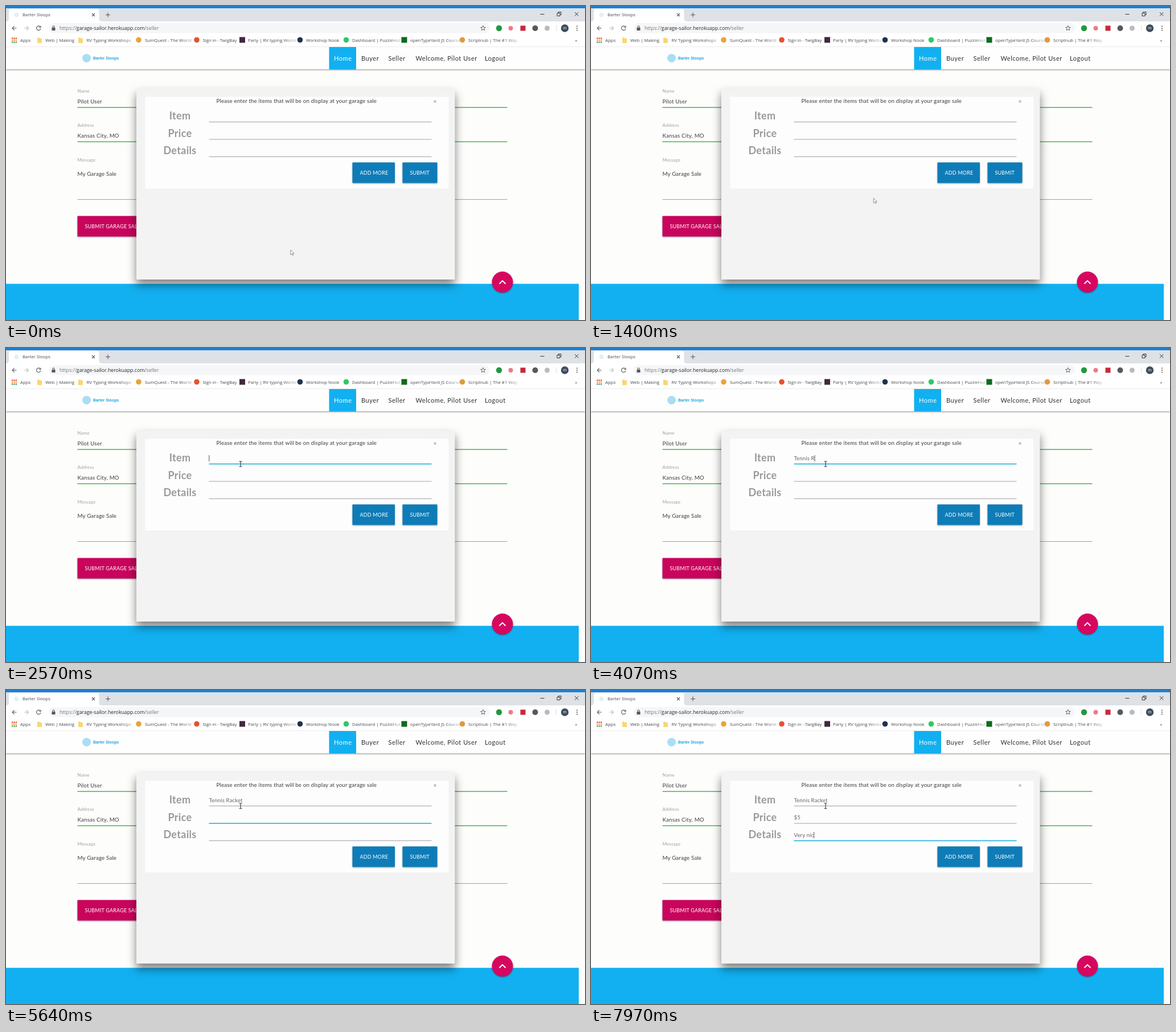
Recreate the animation shown at these times as an HTML page. Size 1017x551 px, loop 8000 ms.

```html
<!DOCTYPE html>
<html lang="en">
<head>
<meta charset="utf-8">
<title>Barter Sloops</title>
<style>
  html, body { margin: 0; width: 100%; height: 100%; overflow: hidden; background: #fdfdfc; }
  svg { display: block; width: 100vw; height: 100vh; }
  text { font: 9.7px Lato, sans-serif; letter-spacing: .018em; fill: #3c3c3c; white-space: pre; }
  .ui text { font: 7.8px "Open Sans", sans-serif; letter-spacing: 0; fill: #45484c; }
  .ui .url { font-size: 8.75px; fill: #75797e; }
  .url tspan { fill: #26282b; }
  .ui .badge { font-size: 7px; fill: #fff; text-anchor: middle; }
  .icon { fill: none; stroke: #55585c; stroke-width: 1.1; }
  .nav text { font-size: 11px; letter-spacing: .55px; fill: #2c2c2c; }
  .nav .brand { font: bold 6.9px "Liberation Sans", Arial, sans-serif; letter-spacing: 0; fill: #1aa5e0; }
  .nav .on { fill: #fff; }
  .label text { font-size: 8px; fill: #a0a0a0; }
  .head text { font-size: 18px; font-weight: bold; fill: #999; text-anchor: middle; }
  .btn { filter: drop-shadow(0 1px 1.2px rgba(0, 0, 0, .4)); }
  .btn text { font-size: 9px; fill: #fff; letter-spacing: .02em; }
  .field text { font-size: 9.5px; fill: #666; }
  .bar { filter: drop-shadow(0 1px 1.5px rgba(0, 0, 0, .45)); }
  .modal { filter: drop-shadow(0 9px 8px rgba(0, 0, 0, .5)); }
</style>
</head>
<body>
<svg viewBox="0 0 1017 551">
  <defs>
    <linearGradient id="fade">
      <stop offset="0" stop-color="#fff" stop-opacity="0"/>
      <stop offset=".6" stop-color="#fff"/>
    </linearGradient>
  </defs>

  <rect width="1017" height="551" fill="#fdfdfc"/>

  <g class="label">
    <text x="125.5" y="152">Name</text>
    <text x="125.5" y="212">Address</text>
    <text x="125.5" y="272.5">Message</text>
  </g>
  <text x="125.5" y="171">Pilot User</text>
  <text x="125.5" y="231">Kansas City, MO</text>
  <text x="125.5" y="297.5">My Garage Sale</text>
  <path d="M125.5 178H880.5M125.5 238.2H880.5" stroke="#4db451" stroke-width="1.6"/>
  <path d="M125.5 339.5H880.5" stroke="#a0a0a8"/>
  <g class="btn">
    <rect x="125.5" y="368.5" width="125" height="36" rx="1" fill="#c9045c"/>
    <text x="138.5" y="390">SUBMIT GARAGE SALE</text>
  </g>
  <rect y="487.5" width="1006" height="63.5" fill="#12b0f0"/>

  <g class="nav">
    <rect class="bar" y="60" width="1017" height="51" fill="#fefefe"/>
    <rect x="567.5" y="72" width="47.5" height="39.5" fill="#12b0f0"/>
    <circle cx="141.5" cy="91.5" r="7.5" fill="#a9def4"/>
    <text class="brand" x="153" y="94">Barter Sloops</text>
    <text class="on" x="576" y="95.5">Home</text>
    <text x="624" y="95.5">Buyer</text>
    <text x="671.5" y="95.5">Seller</text>
    <text x="719.5" y="95.5">Welcome, Pilot User</text>
    <text x="841" y="95.5">Logout</text>
  </g>

  <g class="ui">
    <rect width="1017" height="27" fill="#dee1e6"/>
    <rect width="1017" height="4" fill="#1c80d2"/>
    <path d="M0 27Q5 27 5 22V9Q5 5 9 5H159Q163.500 5 163.500 9V22Q163.500 27 168 27H1017V71.500H0Z" fill="#fff"/>
    <circle cx="18.500" cy="15.500" r="4" fill="#dff1f8"/>
    <text x="29" y="18.300">Barter Sloops</text>
    <path class="icon" d="M151 13l5 5m0-5l-5 5M175 15.500h8m-4-4v8"/>
    <path class="icon" d="M938.500 14.500h7M968 12.500h5v5h-5zM970 12v-1.500h5v5h-1.500M999 11l6.500 6.500m0-6.500l-6.500 6.500" style="stroke:#222;stroke-width:.9"/>
    <rect x="75" y="30" width="775" height="17.500" rx="8.700" fill="#f5f6f7"/>
    <path class="icon" d="M18.500 39H11m3.700-3.700L11 39l3.700 3.700"/>
    <path class="icon" d="M32 39h7.500m-3.700-3.700l3.700 3.700l-3.700 3.700" style="stroke:#bbb"/>
    <path class="icon" d="M60 36.300a3.700 3.700 0 1 0 .900 3.500M61 34.700v3h-3"/>
    <path d="M80.500 38h6v5h-6z" fill="#55585c"/>
    <path class="icon" d="M82 38v-1.500a1.500 1.500 0 0 1 3 0V38"/>
    <text class="url" x="94" y="42">https://<tspan>garage-sailor.herokuapp.com</tspan>/seller</text>
    <path class="icon" d="M838 34.500l1.200 2.900 3.100.2-2.400 2 .8 3.100-2.700-1.700-2.700 1.700.8-3.100-2.400-2 3.100-.2z" style="stroke-width:.9"/>
    <circle cx="866" cy="39" r="5.200" fill="#23973f"/>
    <circle cx="886.500" cy="39" r="4" fill="#f0788c"/>
    <rect x="903.500" y="34.500" width="9" height="9" fill="#c8283c"/>
    <circle cx="929.500" cy="39" r="5" fill="#55585c"/>
    <circle cx="950.500" cy="39" r="4.500" fill="#b9bbc0"/>
    <path d="M966.500 34v10" stroke="#ddd"/>
    <circle cx="981.500" cy="39" r="6.700" fill="#3c4d5c"/>
    <text class="badge" x="981.500" y="41.200">m</text>
    <path d="M1003 35.500h.01M1003 39h.01M1003 42.500h.01" stroke="#444" stroke-width="1.800" stroke-linecap="round"/>
    <g id="marks"></g>
    <text x="999.500" y="62.500">»</text>
    <path d="M0 71.500H1017" stroke="#e4e4e6" stroke-width=".7"/>
  </g>

  <rect class="modal" x="229" y="145" width="559.500" height="335" fill="#f3f3f4"/>
  <rect x="244.500" y="159.500" width="533" height="160.500" fill="#fdfdfd"/>
  <text x="369.500" y="169.700">Please enter the items that will be on display at your garage sale</text>
  <path d="M751.500 165.500l4 4m0-4l-4 4" stroke="#b4b4b4" stroke-width="1.400"/>
  <g class="head">
    <text x="305.500" y="199.300">Item</text>
    <text x="305.500" y="229.800">Price</text>
    <text x="305.500" y="260.300">Details</text>
  </g>
  <g class="field" id="fields"></g>
  <path id="caret" d="M0 0v11" stroke="#444" stroke-width=".9"/>
  <g class="btn">
    <rect x="608.500" y="274.500" width="74.500" height="36" rx="1" fill="#0e7cb8"/>
    <text x="621.500" y="296">ADD MORE</text>
  </g>
  <g class="btn">
    <rect x="696.500" y="274.500" width="61" height="36" rx="1" fill="#0e7cb8"/>
    <text x="709.500" y="296">SUBMIT</text>
  </g>

  <circle class="btn" cx="872" cy="484.500" r="18.500" fill="#d6075f"/>
  <path d="M866.500 487.500l5.500-5.500 5.500 5.500" fill="none" stroke="#fff" stroke-width="1.900"/>

  <path id="arrow" d="M0 0V8.500L2 6.700L3.400 9.700L4.800 9L3.400 6.200H6Z" fill="#fff" stroke="#777" stroke-width=".8"/>
  <path id="beam" d="M-2.500-4.500H2.500M-2.500 4.500H2.500M0-4.500V4.500" fill="none" stroke="#333" stroke-width="1.100"/>
</svg>
<script>
const LOOP = 8000;
const $ = id => document.getElementById(id);

function add(parent, tag, attrs, content = '') {
  const el = document.createElementNS('http://www.w3.org/2000/svg', tag);
  for (const k in attrs) el.setAttribute(k, attrs[k]);
  el.textContent = content;
  parent.append(el);
  return el;
}

// Bookmarks: icon centre, kind, colour, label, text start, optional cut-off
const marks = [
  [59, 'folder', '#f7d774', 'Web | Making', 69],
  [131, 'folder', '#f7d774', 'RV Typing Workshops', 141.5, 215],
  [233, 'dot', '#e8a33c', 'SumQuest - The World', 244, 318],
  [335, 'dot', '#e5532d', 'Sign in · TwigBay', 345.500],
  [415, 'box', '#43283f', 'Parly | RV typing Works', 425, 498],
  [516.500, 'dot', '#1f3350', 'Workshop Nook', 527],
  [597.500, 'dot', '#2ec866', 'Dashboard | PuzzleHut', 608, 683],
  [699.500, 'box', '#0b6b1d', 'openTypeYard JS Course', 710, 785],
  [801.500, 'dot', '#e09a3e', 'Scriptnub | The #1 Way', 812, 886],
];
const bar = $('marks');
['#e04a3f', '#e8a33c', '#3b9a55'].forEach((fill, r) => {
  for (let c = 0; c < 3; c++)
    add(bar, 'rect', { x: 10 + c * 3.4, y: 55.500 + r * 3.4, width: 2.300, height: 2.300, fill });
});
add(bar, 'text', { x: 25, y: 62.500 }, 'Apps');
for (const [x, kind, fill, label, tx, end] of marks) {
  if (kind === 'folder') add(bar, 'path', { d: `M${x - 4} 55.500h3.500l1 1.500h3.500v8h-8z`, fill });
  else if (kind === 'box') add(bar, 'rect', { x: x - 5, y: 54.500, width: 10, height: 10, fill });
  else add(bar, 'circle', { cx: x, cy: 59.500, r: 4.800, fill });
  add(bar, 'text', { x: tx, y: 62.500 }, label);
  if (end) add(bar, 'rect', { x: end - 13, y: 52, width: 60, height: 16, fill: 'url(#fade)' });
}

// Each field: focus and blur times, text, time of each keystroke
const steps = (from, to, n) => Array.from({ length: n }, (_, i) => from + (to - from) * i / (n - 1));
const fields = [
  { y: 203.500, on: 2080, off: 5100, text: 'Tennis Racket', keys: steps(2950, 4780, 13) },
  { y: 234, on: 5100, off: 6540, text: '$5', keys: [5930, 6130] },
  { y: 264.500, on: 6540, off: LOOP, text: 'Very nic', keys: steps(6880, 7930, 8) },
];
const group = $('fields');
for (const f of fields) {
  f.line = add(group, 'path', { d: `M356.500 ${f.y}H747.500` });
  f.el = add(group, 'text', { x: 356.500, y: f.y - 7 });
}

const clamp = v => Math.min(1, Math.max(0, v));

// Pointer path: time, x, y
const path = [[0, 500, 428], [1260, 500, 428], [1400, 496.500, 337.500], [1600, 452, 240], [1850, 412, 203.500], [LOOP, 412, 203.500]];
function pointer(t) {
  const i = path.findIndex(p => p[0] > t);
  const [t0, x0, y0] = path[i - 1], [t1, x1, y1] = path[i];
  const k = (t - t0) / (t1 - t0);
  return [x0 + (x1 - x0) * k, y0 + (y1 - y0) * k];
}

function draw(now) {
  const t = now % LOOP;
  let caret = null;
  for (const f of fields) {
    const typed = f.keys.filter(k => k <= t);
    f.el.textContent = f.text.slice(0, typed.length);
    const focus = clamp((t - f.on) / 300) * (1 - clamp((t - f.off) / 300));
    const mix = (a, b) => Math.round(a + (b - a) * focus);
    f.line.setAttribute('stroke', `rgb(${mix(160, 24)},${mix(160, 168)},${mix(172, 222)})`);
    f.line.setAttribute('stroke-width', 1 + .7 * focus);
    if (t >= f.on && t < f.off) {
      const since = t - (typed.length ? typed[typed.length - 1] : f.on);
      if (since % 1000 < 500) caret = [356.800 + f.el.getComputedTextLength(), f.y - 15.500];
    }
  }
  $('caret').setAttribute('visibility', caret ? 'visible' : 'hidden');
  if (caret) $('caret').setAttribute('transform', `translate(${caret})`);

  const [x, y] = pointer(t);
  const over = y < 212;
  $('arrow').setAttribute('visibility', over ? 'hidden' : 'visible');
  $('beam').setAttribute('visibility', over ? 'visible' : 'hidden');
  $(over ? 'beam' : 'arrow').setAttribute('transform', `translate(${x},${y})`);
  requestAnimationFrame(() => draw(performance.now()));
}
draw(performance.now());
</script>
</body>
</html>
```
